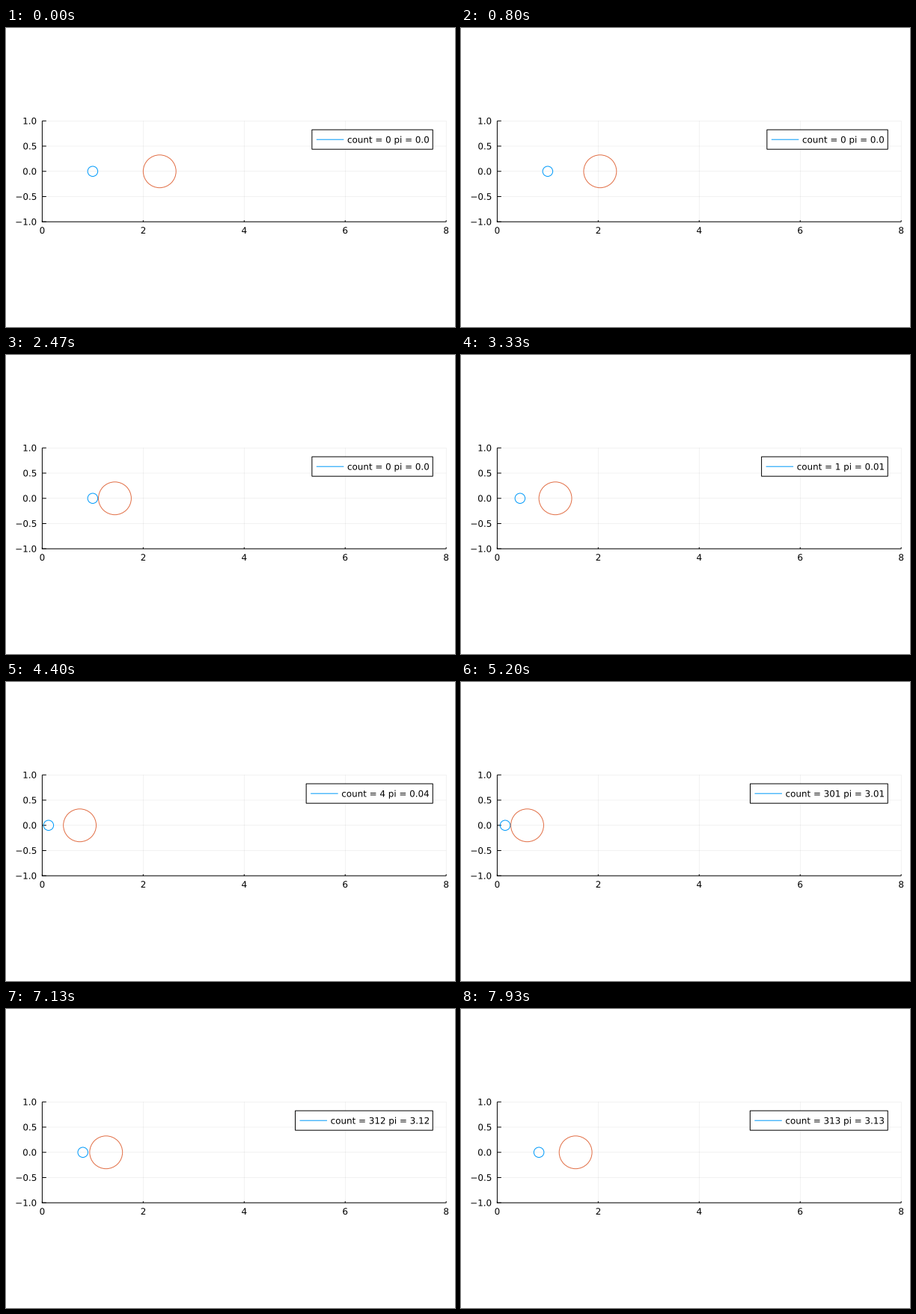
A matplotlib script that plays this animation: 600x400 px, repeating every 8 s.

```python
import math

import matplotlib.pyplot as plt
from matplotlib.animation import FuncAnimation
from matplotlib.patches import Circle, PathPatch, Rectangle
from matplotlib.path import Path
from matplotlib.textpath import TextPath

W, H, DPI = 600, 400, 100
PX = 72 / DPI                      # one pixel in points
FRAMES, LOOP = 120, 8000
BLUE, ORANGE = "#009afa", "#e26f46"

plt.rcParams["font.family"] = "DejaVu Sans"

# plot area in pixels, y downwards
LEFT, UNIT, MID = 48.4, 67.475, 191.75
RIGHT, TOP, BOTTOM = LEFT + 8 * UNIT, MID - UNIT, MID + UNIT
FONT = 11.9

# two balls and a wall at x = 0
R_SMALL, R_BIG = 0.1, 0.325
SPEED = 0.02396                    # units per frame
MASS_ROOT = 100                    # square root of the mass ratio
WEDGE = math.atan(1 / MASS_ROOT)
SMALL_START = 1 - R_SMALL          # gap between wall and small ball
BIG_START = 2 - 2 * R_SMALL        # big ball's near edge, less one small ball

fig = plt.figure(figsize=(W / DPI, H / DPI), dpi=DPI, facecolor="white")
ax = fig.add_axes([0, 0, 1, 1])
ax.set_xlim(0, W)
ax.set_ylim(H, 0)
ax.axis("off")


def px(x):
    return LEFT + UNIT * x


def line(xs, ys, z=2, color="black", width=1, alpha=1):
    return ax.plot(xs, ys, color=color, lw=width * PX, alpha=alpha, zorder=z,
                   snap=False, solid_capstyle="butt")[0]


def text_path(text, x, baseline, align):
    """Glyph outlines whose ink is right-aligned or centred on x."""
    path = TextPath((0, 0), text, size=FONT)
    box = path.get_extents()
    shift = x - (box.x1 if align == "right" else (box.x0 + box.x1) / 2)
    pts = path.vertices.copy()
    pts[:, 0] += shift
    pts[:, 1] = baseline - pts[:, 1]
    return Path(pts, path.codes), box.x0 + shift


def label(text, x, baseline, align):
    path, _ = text_path(text, x, baseline, align)
    ax.add_patch(PathPatch(path, fc="black", lw=0, zorder=3, snap=False))


def ball(radius, color):
    patch = Circle((0, MID), radius * UNIT, fill=False, ec=color, lw=PX, zorder=4)
    return ax.add_patch(patch)


for v in range(0, 9, 2):
    x = px(v)
    line([x, x], [TOP, BOTTOM], 1, width=0.5, alpha=0.1)
    line([x, x], [BOTTOM, BOTTOM - 2.03])
    label(str(v), x, 275, "center")

for k in range(-2, 3):
    y = MID - k * UNIT / 2
    line([LEFT, RIGHT], [y, y], 1, width=0.5, alpha=0.1)
    line([LEFT, LEFT + 5.4], [y, y])
    label(f"{k / 2:.1f}".replace("-", "\u2212"), 40.3, y + 4.35, "right")

line([LEFT, LEFT], [TOP, BOTTOM + 0.5])
line([LEFT - 0.5, RIGHT], [BOTTOM, BOTTOM])

small = ball(R_SMALL, BLUE)
big = ball(R_BIG, ORANGE)

BOX_TOP, BOX_BOTTOM, BOX_RIGHT = 136.1, 162.2, 570.3
frame_box = ax.add_patch(Rectangle((0, BOX_TOP), 1, BOX_BOTTOM - BOX_TOP, fc="white",
                                   ec="black", lw=PX, zorder=5, snap=False))
sample = line([0, 1], [149.2, 149.2], 6, BLUE)
caption = ax.add_patch(PathPatch(Path([(0, 0), (1, 1)]), fc="black", lw=0,
                                 zorder=6, snap=False))


def state(frame):
    """Ball centres and collision count, by unfolding bounces into one straight path."""
    run = MASS_ROOT * (BIG_START - SPEED * frame)
    angle = math.atan2(SMALL_START, run)
    dist = math.hypot(SMALL_START, run)
    count = int(angle / WEDGE)
    rest = angle - count * WEDGE
    if count % 2:
        rest = WEDGE - rest
    x_small = R_SMALL + dist * math.sin(rest)
    x_big = 2 * R_SMALL + R_BIG + dist * math.cos(rest) / MASS_ROOT
    return x_small, x_big, count


def draw(frame):
    x_small, x_big, count = state(frame)
    small.center = (px(x_small), MID)
    big.center = (px(x_big), MID)

    path, ink = text_path(f"count = {count} pi = {count / 100}", 565.0, 153.6, "right")
    caption.set_path(path)
    left = ink - 47.8
    frame_box.set_x(left)
    frame_box.set_width(BOX_RIGHT - left)
    sample.set_xdata([left + 6, left + 42.5])
    return small, big, frame_box, sample, caption


anim = FuncAnimation(fig, draw, frames=FRAMES, interval=LOOP / FRAMES,
                     init_func=lambda: draw(0), repeat=True, repeat_delay=0)
plt.show()
```
